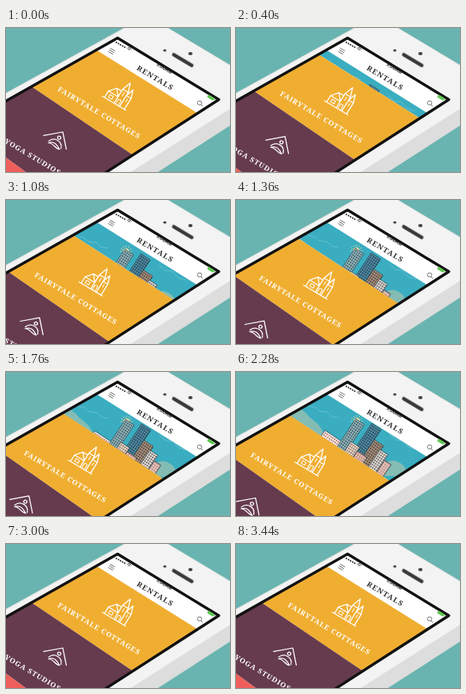
An HTML page for the animation above (3480 ms loop, 280 px wide and 180 px high).

```html
<!DOCTYPE html>
<html lang="en">
<head>
<meta charset="utf-8">
<title>Rentals</title>
<style>
  html, body { margin: 0; width: 100%; height: 100%; overflow: hidden; background: #69b4b0; }
  svg { display: block; width: 100vw; height: 100vh; }
  text { text-anchor: middle; font-family: "Noto Serif", serif; font-weight: 700; }
  .line { fill: none; stroke: #fff; stroke-width: 1.3; stroke-linejoin: round; stroke-linecap: round; }
  .label { fill: #fff; font-size: 9px; letter-spacing: .9px; }
</style>
</head>
<body>
<svg viewBox="0 0 280 180">
  <defs>
    <clipPath id="skyClip"><polygon id="skyShape"/></clipPath>
  </defs>
  <rect width="280" height="180" fill="#69b4b0"/>

  <!-- phone body -->
  <path d="M0 81 147 0H203L280 46V122L190 180H0Z" fill="#dcdddc"/>
  <path d="M0 82 149 0H202L280 47V101L156 180H0Z" fill="#f2f3f2"/>
  <g transform="matrix(.858 .513 -.5 .8 221 40)">
    <rect x="-16" y="-3" width="32" height="6" rx="3" fill="#c4c4c4"/>
    <rect x="-15" y="-2" width="30" height="4.2" rx="2.1" fill="#3a3a3a"/>
  </g>
  <ellipse cx="230.5" cy="32" rx="2.7" ry="2" fill="#444"/>
  <ellipse cx="198.5" cy="28" rx="2" ry="1.5" fill="#444"/>

  <polygon id="screen" fill="#fff"/>
  <polygon id="sky" fill="#3aadc1"/>
  <g clip-path="url(#skyClip)"><g id="city"></g></g>
  <polygon id="cottages" fill="#f0ae31"/>
  <polygon id="yoga" fill="#653b4d"/>
  <polygon id="next" fill="#ee5f5b"/>
  <polygon id="border" fill="none" stroke="#111" stroke-width="3.4" stroke-linejoin="round"/>

  <g id="church" class="line">
    <path d="M-17 10H17M-14 10V0L-7-9 0 0V10M-7-9H0M0 10V-12L4-24 8-12V10M8 10V-7L11.5-18 15-7V10M0-12H8M8-7H15M-14 0H0"/>
    <path d="M4-9V-4M11.5-4V0M2 10V4a2 2 0 0 1 4 0V10M-10 3h5v4h-5z" stroke-width="1"/>
  </g>
  <text id="cottageText" class="label">FAIRYTALE COTTAGES</text>
  <g id="lotus" class="line">
    <path d="M-18 7 0-10 15 7"/>
    <circle cy="-1" r="2"/>
    <path d="M-9 10C-7 4-3 3 0 3S7 4 9 10M-8 12C-3 6 2 8 8 12M8 12C3 14-3 9-8 12"/>
  </g>
  <text id="yogaText" class="label">YOGA STUDIOS</text>

  <!-- header -->
  <g id="dots" fill="#222"></g>
  <path d="M151.5 25.6q3-2.5 5 1.2M152.6 27q1.6-1 2.6.7" fill="none" stroke="#222" stroke-width=".9"/>
  <text id="clock" font-size="6" fill="#222" style="font-family:'Open Sans',sans-serif">9:00AM</text>
  <g id="battery">
    <rect x="-4.5" y="-2" width="9" height="4" rx="1" fill="#63c655"/>
    <rect x="4.8" y="-.8" width="1" height="1.6" fill="#63c655"/>
  </g>
  <path id="menu" d="M-3.6-2.6H3.6M-3.6 0H3.6M-3.6 2.6H3.6" fill="none" stroke="#555" stroke-width=".8"/>
  <path d="M244 96 245.8 98" stroke="#555" stroke-width=".9"/>
  <ellipse cx="242" cy="93.6" rx="2.7" ry="2.6" fill="none" stroke="#555" stroke-width=".8"/>
  <text id="title" font-size="9.2" letter-spacing="1.2" fill="#2e2e30">RENTALS</text>
</svg>
<script>
const LOOP = 3480, STEP = 40, HEADER = 26.5, OPEN = 47;
const $ = id => document.getElementById(id);

// Points on the tilted screen: d runs down its sides.
const left = d => [139.5 - d, 12.5 + .565 * d];
const right = d => [266 - d, 89.5 + .645 * d];
const band = (id, a, b) =>
  $(id).setAttribute("points", [left(a), right(a), right(b), left(b)].join(" "));
const place = (id, x, y) =>
  $(id).setAttribute("transform", `matrix(.858 .513 -.5 .8 ${x} ${y})`);
const slide = (id, x, y, s) => place(id, x - s, y + .59 * s);

function building(x, w, h, fill, glass) {
  let out = `<rect x="${x}" y="${-h}" width="${w}" height="${h + 12}" fill="${fill}" stroke="#26424d" stroke-width=".7"/>`;
  for (let y = 2; y < h; y += 3.4)
    for (let i = 1.6; i < w - 1; i += 2.8)
      out += `<rect x="${x + i}" y="${y - h}" width="1.5" height="1.8" fill="${glass}"/>`;
  return out;
}

function drawCity() {
  let rays = "";
  for (let i = 0; i < 12; i++) {
    const a = i * Math.PI / 6, c = Math.cos(a), s = Math.sin(a);
    rays += `M${151 + 5.6 * c} ${61.5 + 5.6 * s}L${151 + 7.6 * c} ${61.5 + 7.6 * s}`;
  }
  $("city").innerHTML =
    `<path d="${rays}" stroke="#f3dc98" stroke-width=".8"/>
     <circle cx="151" cy="61.5" r="4.2" fill="#f8e2a0"/>
     <path d="M90 42l9 2 5 5 10 1 6 6 9 1M192 78l8 7 9 1 7 8 10 3" fill="none" stroke="#78c8d2" stroke-width=".7"/>
     <path d="M60 52C72 40 84 46 90 54S106 62 112 84ZM176 130C182 112 194 108 202 112S212 118 214 130Z" fill="#84bcb4"/>
     <g transform="matrix(.83 .55 -.5 .75 130 95)">` +
    building(-28, 30, 9, "#f0ebe4", "#b65a55") +
    building(16, 14, 53, "#4e87a0", "#213c49") +
    building(-4, 13, 46, "#8fb0b5", "#2f4c58") +
    building(30, 14, 36, "#a58d78", "#3f3a3c") +
    building(43, 12, 29, "#dfd8d0", "#4c4a50") +
    building(55, 10, 20, "#c99a92", "#f0e4da") +
    building(7, 13, 16, "#e3d3c4", "#7c5e58") +
    building(20, 14, 10, "#c68f83", "#f0e4da") +
    `</g>`;
}

function pull(t) {
  if (t < 60) return 0;
  if (t < 1200) return .0285 * (t - 60);
  if (t < 2530) {
    const q = 1 - Math.min(1, (t - 1200) / 1300);
    return 32.5 + 14.5 * (1 - q * q);
  }
  const p = Math.min(1, (t - 2530) / 440);
  return OPEN * (p < .5 ? 1 - 8 * p ** 4 : 8 * (1 - p) ** 4);
}

function draw(t) {
  const s = pull(t);
  const top = HEADER + s, mid = 107.5 + s, low = 194 + s;
  band("sky", HEADER, top);
  band("skyShape", HEADER, top);
  band("cottages", top, mid);
  band("yoga", mid, low);
  band("next", low, low + 80);
  slide("church", 140, 86, s);
  slide("cottageText", 115, 108.5, s);
  slide("lotus", 66, 138, s);
  slide("yogaText", 32, 163.5, s);
  const rise = 9 * (1 - s / OPEN);
  $("city").setAttribute("transform", `translate(${-.3 * rise} ${.9 * rise})`);
}

band("screen", 0, 300);
band("border", 0, 300);
drawCity();
for (let i = 0; i < 5; i++)
  $("dots").innerHTML += `<circle cx="${138 + 2.6 * i}" cy="${18 + 1.5 * i}" r="1"/>`;
place("clock", 197, 52);
place("battery", 256, 87);
place("menu", 132, 29);
place("title", 185, 65);

function tick(now) {
  draw(Math.floor(now % LOOP / STEP) * STEP);
  requestAnimationFrame(tick);
}
draw(0);
requestAnimationFrame(tick);
</script>
</body>
</html>
```
